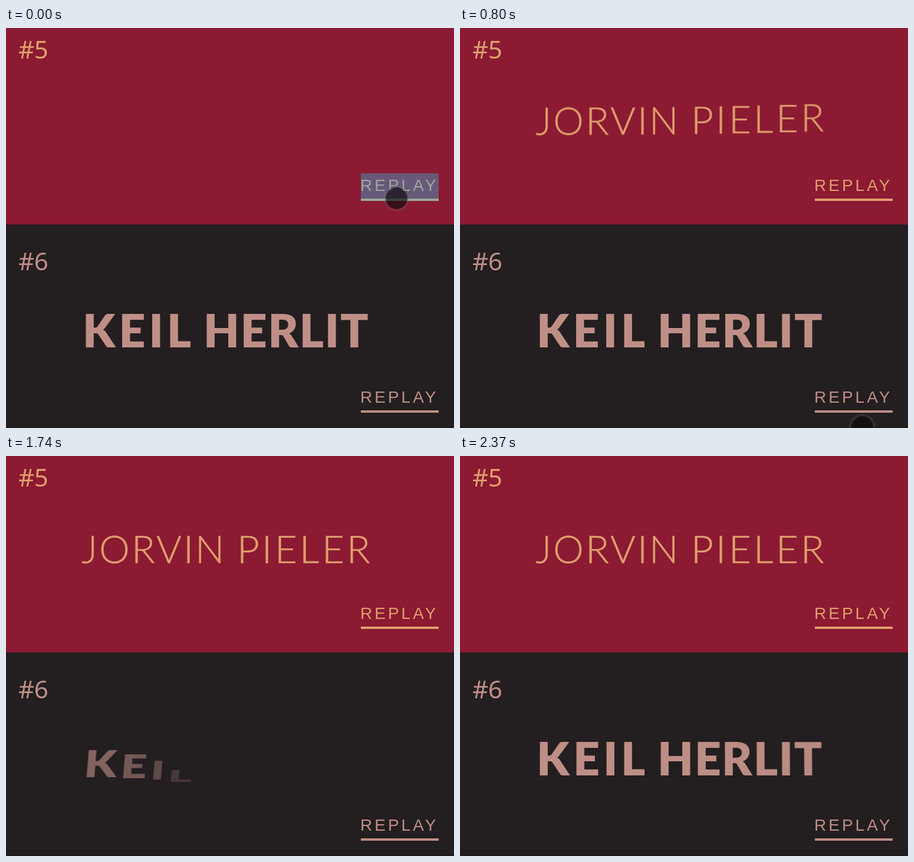
An HTML page that plays this animation: 760 px wide and 680 px high, repeating every 2.44 s.

```html
<!DOCTYPE html>
<html lang="en">
<head>
<meta charset="utf-8">
<title>Lettering replay</title>
<style>
  html, body { margin: 0; width: 100%; height: 100%; overflow: hidden; background: #231e20; }
  #stage { position: relative; width: 760px; height: 680px; overflow: hidden; background: #231e20; }
  #stage * { position: absolute; white-space: pre; }
  .panel { left: 0; width: 760px; height: 334px; }
  #red { top: 0; color: #e09f6d; background: #8b1a32; }
  #dark { top: 360px; color: #bf8f87; }
  .num { left: 21px; top: 8px; font: 42px/56px "Noto Sans", "Open Sans", sans-serif; letter-spacing: -.5px; }
  .replay { left: 602px; top: 247px; width: 132px; height: 43px; border-bottom: 4px solid;
    font: 28px/42px "Liberation Sans", Arial, sans-serif; letter-spacing: 4px; text-indent: -1px; }
  .flash { left: 0; top: 0; width: 132px; height: 47px; background: rgba(51, 181, 229, .4); }
  .name { left: 0; top: 0; width: 760px; height: 680px; }
  #thin { color: #e09f6d; -webkit-text-stroke: .6px; }
  #bold { color: #bf8f87; perspective: 2000px; perspective-origin: 374px 516px; }
  #thin span { transform-origin: 50% 50%; }
  #bold span { transform-origin: 50% 100%; }
  #edge { left: 0; top: 678px; width: 760px; height: 2px; background: rgba(0, 0, 0, .15); }
  #touch { left: 0; top: 0; box-sizing: border-box; border-radius: 50%; background-clip: padding-box; }
  #touch.move { width: 45px; height: 45px; margin: -22.5px; background-color: rgba(10, 10, 12, .65);
    border: 4px solid rgba(110, 108, 110, .22); }
  #touch.press { width: 48px; height: 48px; margin: -24px; background-color: rgba(134, 134, 4, .94);
    border: 5px solid rgba(150, 150, 20, .92); }
</style>
</head>
<body>
<div id="stage">
  <div class="panel" id="red">
    <div class="num">#5</div>
    <div class="replay">REPLAY<div class="flash"></div></div>
  </div>
  <div class="panel" id="dark">
    <div class="num">#6</div>
    <div class="replay">REPLAY<div class="flash"></div></div>
  </div>
  <div class="name" id="thin"></div>
  <div class="name" id="bold"></div>
  <div id="edge"></div>
  <div id="touch"></div>
</div>
<script>
const LOOP = 2440;
const RATE = 0.0071;
const STAGGER = 32;

// moments at which the picture is refreshed
const TICKS = [0, 70, 140, 200, 270, 330, 390, 460, 520, 590, 660, 730, 800, 850,
  910, 980, 1040, 1100, 1160, 1250, 1430, 1560, 1630, 1690, 1740, 1810, 1870,
  1940, 1990, 2060, 2120, 2190, 2250, 2310, 2370];

// touch point: time, x, y
const PATH = [[0, 662, 289], [260, 682, 445], [520, 704, 605], [590, 698, 618],
  [660, 692, 640], [800, 682, 678], [1000, 678, 670], [1250, 678, 656],
  [1430, 681, 658], [1630, 681, 658]];

const $ = id => document.getElementById(id);
const pen = document.createElement("canvas").getContext("2d");
const flashes = document.querySelectorAll(".flash");
const touch = $("touch");

// Sets one word between two ink edges by tracking; returns its letters.
function setWord(host, text, left, right, base, size, weight, first) {
  const font = `${weight} ${size}px Lato, "Open Sans", sans-serif`;
  pen.font = font;
  const sizes = [...text].map(c => pen.measureText(c));
  const last = sizes[sizes.length - 1];
  const start = -sizes[0].actualBoundingBoxLeft;
  const total = sizes.reduce((sum, m) => sum + m.width, 0);
  const ink = total - start - (last.width - last.actualBoundingBoxRight);
  const track = (right - left - ink) / (text.length - 1);
  let x = left - start;
  return [...text].map((c, i) => {
    const el = document.createElement("span");
    el.textContent = c;
    el.style.font = font;
    el.style.lineHeight = "1.2";
    el.style.left = x + "px";
    el.style.top = base - size * 0.987 + "px";
    host.append(el);
    x += sizes[i].width + track;
    return { el, index: first + i };
  });
}

const thin = [
  ...setWord($("thin"), "JORVIN", 128, 364, 182.5, 65.5, 300, 0),
  ...setWord($("thin"), "PIELER", 398, 617, 182.5, 65.5, 300, 7)
];
const bold = [
  ...setWord($("bold"), "KEIL", 135, 313, 543.5, 78.5, 900, 0),
  ...setWord($("bold"), "HERLIT", 340, 614, 543.5, 78.5, 900, 5)
];

// Remaining share of the move: 1 before the start, then an exponential decay.
const rest = (t, start, i) => Math.exp(-RATE * Math.max(0, t - start - i * STAGGER));

function pathAt(t) {
  let k = 1;
  while (k < PATH.length - 1 && PATH[k][0] < t) k++;
  const [t0, x0, y0] = PATH[k - 1], [t1, x1, y1] = PATH[k];
  const p = Math.min(1, (t - t0) / (t1 - t0));
  return [x0 + (x1 - x0) * p, y0 + (y1 - y0) * p];
}

function draw(time) {
  const t = TICKS.filter(v => v <= time).pop();

  for (const { el, index } of thin) {
    const r = rest(t, -5, index);
    el.style.opacity = t < 70 ? 0 : 1 - r;
    el.style.transform = `translateY(${-125 * r}px) rotateY(${180 * r}deg)`;
  }
  for (const { el, index } of bold) {
    const r = t < 1560 ? 0 : rest(t, 1608, index);
    el.style.opacity = 1 - r;
    el.style.transform = r ? `rotateX(${90 * r}deg)` : "none";
  }

  flashes[0].hidden = t >= 70;
  flashes[1].hidden = t < 1560 || t >= 1630;

  const [x, y] = pathAt(t);
  touch.hidden = t >= 1630;
  touch.className = t >= 1430 && t < 1560 ? "press" : "move";
  touch.style.transform = `translate(${x}px, ${y}px)`;
}

const begin = performance.now();
function loop() {
  draw((performance.now() - begin) % LOOP);
  requestAnimationFrame(loop);
}
loop();
</script>
</body>
</html>
```
